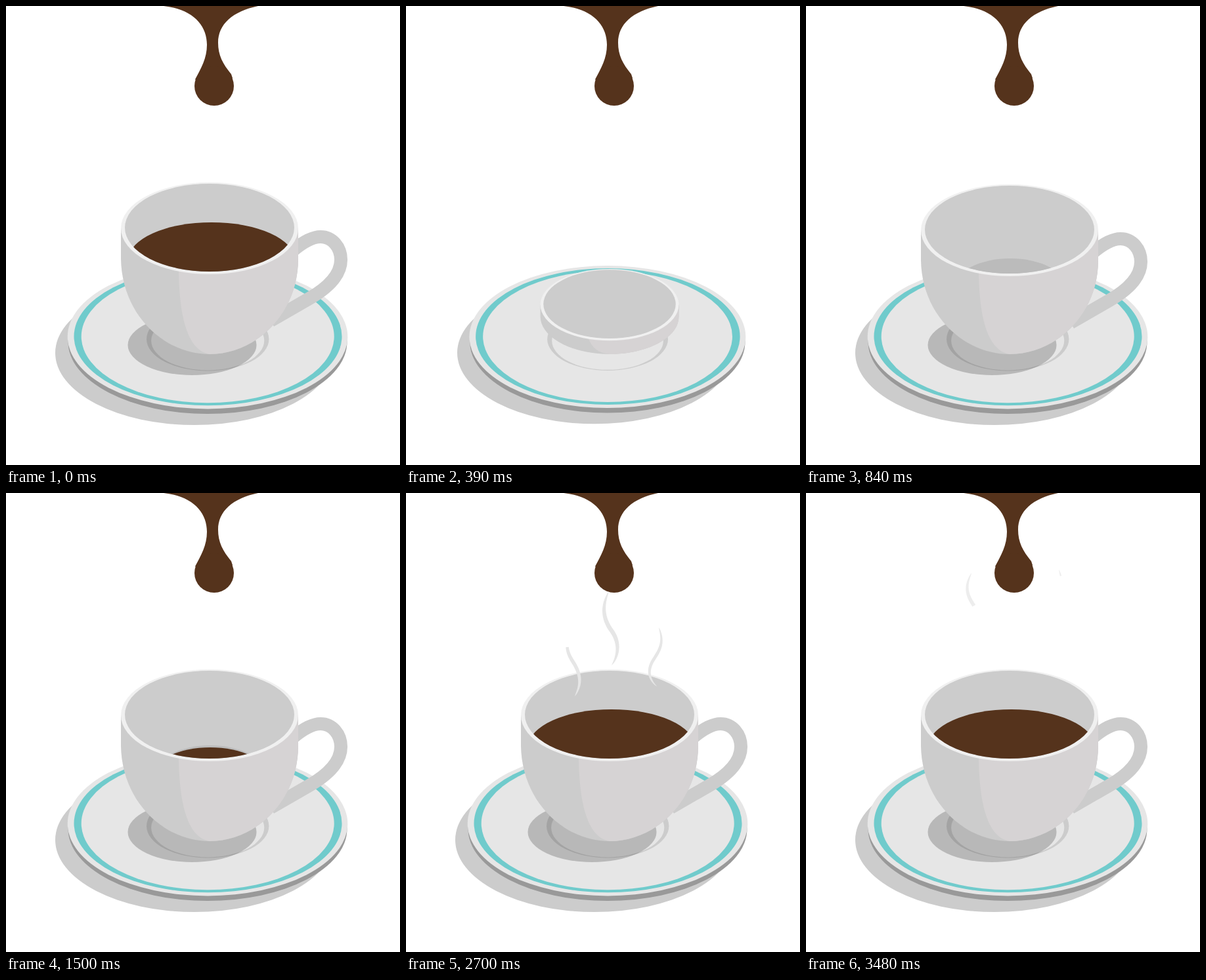
Animation, 600 px wide and 700 px high, one loop 4290 ms. Source, as an HTML page:

```html
<!DOCTYPE html>
<html lang="en">
<head>
<meta charset="utf-8">
<title>Coffee cup</title>
<style>
html, body { margin: 0; width: 100%; height: 100%; overflow: hidden; background: #fff; }
svg { display: block; width: 600px; height: 700px; }
</style>
</head>
<body>
<svg viewBox="0 0 600 700" xmlns="http://www.w3.org/2000/svg">
  <defs>
    <clipPath id="bowl"><ellipse id="bowlClip" cx="310"/></clipPath>
  </defs>

  <g id="saucer">
    <ellipse cx="287" cy="529" rx="212" ry="110" fill="#ccc"/>
    <ellipse cx="307" cy="512" rx="212.5" ry="110" fill="#999"/>
    <ellipse cx="307" cy="504.4" rx="213.3" ry="110" fill="#e6e6e6"/>
    <ellipse cx="307.5" cy="503.9" rx="204" ry="105.4" fill="#70cbcc"/>
    <ellipse cx="307.2" cy="503.9" rx="192.5" ry="101.3" fill="#e6e6e6"/>
    <ellipse cx="307.2" cy="507.9" rx="93.2" ry="48.6" fill="#ccc"/>
    <ellipse cx="307.2" cy="510.4" rx="86" ry="45" fill="#e6e6e6"/>
  </g>

  <ellipse id="shade" fill="#000" opacity=".2"/>

  <g id="cup">
    <path id="handle" fill="none" stroke="#ccc" stroke-width="20"
      d="M438 372C455 358 468 352 479 352C497 352 510 368 510 387C510 412 488 431 462 446L403 480"/>
    <g id="body">
      <path fill="#ccc" d="M-135-192V-146C-134-61-70 0 0 0S135-61 135-146V-192Z"/>
      <path fill="#d6d3d4" d="M-47-192V-127C-46-60-35-6 0 0C70 0 135-61 135-146V-192Z"/>
    </g>
    <ellipse id="rim" cx="310" fill="#f0f0f0"/>
    <ellipse id="inside" cx="310" fill="#ccc"/>
    <g clip-path="url(#bowl)">
      <ellipse id="base" cx="311" cy="430" fill="#bbb"/>
      <ellipse id="coffee" fill="#55331c"/>
    </g>
  </g>

  <g fill="#55331c">
    <path d="M240 0C285 5 306 30 306 59C306 80 297 95 288 112L317 128L345 110L343 104C330 88 323 75 323 56C323 28 345 8 384 0Z"/>
    <circle cx="317" cy="122" r="30"/>
  </g>

  <g id="steam" fill="#e6e6e6"></g>
</svg>

<script>
const LOOP = 4290, STEP = 30, LAST = 3480;
const $ = id => document.getElementById(id);
const set = (el, attrs) => { for (const k in attrs) el.setAttribute(k, attrs[k]); };
const clamp = x => Math.max(0, Math.min(1, x));
const smooth = x => x * x * (3 - 2 * x);
const ramp = (t, from, to) => clamp((t - from) / (to - from));

// Value at time t from [time, value] pairs.
function key(t, pairs, ease = smooth) {
  if (t <= pairs[0][0]) return pairs[0][1];
  for (let i = 1; i < pairs.length; i++) {
    const [t0, v0] = pairs[i - 1], [t1, v1] = pairs[i];
    if (t < t1) return v0 + (v1 - v0) * ease((t - t0) / (t1 - t0));
  }
  return pairs[pairs.length - 1][1];
}
const linear = x => x;

const saucerKeys = [[30, 0], [135, 1.1], [240, .9865], [540, .9865], [660, 1.03], [780, 1]];
const rimKeys = [[240, 525], [510, 406], [660, 326], [840, 342], [1020, 339]];
const widthKeys = [[240, 0], [450, 131.5], [510, 131.5], [690, 136], [840, 135]];
const shadeKeys = [[240, 0], [510, .83], [660, 1.03], [780, 1]];
const handleKeys = [[540, 0], [690, 1.05], [810, 1]];
const levelKeys = [[1230, 406], [1500, 388], [1770, 370], [2310, 347], [2680, 330]];
const riseKeys = [[2200, 63], [2700, 0], [2850, -22], [3390, -88]];

// Paths run from the foot of each wisp to its tip.
const wisps = [
  { d: "M257 310C269 290 265 274 254 257C243 240 243 228 252 210", w: 5.5, grow: [2300, 2830], fade: [3200, 3760] },
  { d: "M313 263C326 245 324 225 313 210C302 195 296 175 309 150", w: 6.5, grow: [2220, 2690], fade: [2880, 3420] },
  { d: "M382 295C368 283 368 268 377 254C386 240 394 228 385 205", w: 4.8, grow: [2220, 2690], fade: [2950, 3540] }
];
for (const s of wisps) {
  const guide = document.createElementNS("http://www.w3.org/2000/svg", "path");
  set(guide, { d: s.d });
  s.guide = guide;
  s.len = guide.getTotalLength();
  s.el = document.createElementNS("http://www.w3.org/2000/svg", "path");
  $("steam").append(s.el);
}

// Tapered ribbon covering the part of a wisp between a and b.
function ribbon(s, a, b) {
  if (b - a < .01) return "";
  const left = [], right = [], n = 28;
  for (let i = 0; i <= n; i++) {
    const u = a + (b - a) * i / n, l = u * s.len;
    const p = s.guide.getPointAtLength(l);
    const p0 = s.guide.getPointAtLength(Math.max(0, l - .5));
    const p1 = s.guide.getPointAtLength(Math.min(s.len, l + .5));
    const dx = p1.x - p0.x, dy = p1.y - p0.y;
    const k = s.w / 2 * Math.pow(Math.max(0, Math.sin(Math.PI * u)), .6) / (Math.hypot(dx, dy) || 1);
    left.push((p.x - dy * k).toFixed(2) + " " + (p.y + dx * k).toFixed(2));
    right.unshift((p.x + dy * k).toFixed(2) + " " + (p.y - dx * k).toFixed(2));
  }
  return "M" + left.concat(right).join("L") + "Z";
}

function drawCup(t) {
  const s = key(t, saucerKeys);
  set($("saucer"), { transform: `translate(297.5 516) scale(${s}) translate(-297.5 -516)` });

  const sh = key(t, shadeKeys);
  set($("shade"), { cx: 305 - 21.5 * sh, cy: 495 + 22 * sh, rx: 98 * sh, ry: 46 * sh });

  const cy = key(t, rimKeys), rx = key(t, widthKeys), f = rx / 135;
  set($("cup"), { visibility: rx > 0 ? "visible" : "hidden" });
  set($("body"), { transform: `translate(310 531) scale(${f} ${(531 - cy) / 192})` });
  set($("rim"), { cy, rx, ry: 70 * f });
  const inner = { cy: cy - 1, rx: 129 * f, ry: 67 * f };
  set($("inside"), inner);
  set($("bowlClip"), inner);

  const h = key(t, handleKeys);
  set($("handle"), { transform: `translate(420 ${430 + cy - 339}) scale(${h}) translate(-420 -430)` });

  const b = smooth(ramp(t, 570, 720));
  set($("base"), { rx: 85 * b, ry: 45 * b });

  const top = key(t, levelKeys, linear), k = clamp((388 - top) / 58);
  const ry = 43 + 13 * k;
  set($("coffee"), {
    cx: 311 + 2 * k, cy: top + ry, rx: 87 + 39 * Math.pow(k, .7), ry,
    visibility: t >= 1260 ? "visible" : "hidden"
  });
}

function drawSteam(t) {
  set($("steam"), {
    transform: `translate(0 ${key(t, riseKeys, linear)})`,
    opacity: 1 - .3 * ramp(t, 3000, 3480)
  });
  for (const s of wisps) set(s.el, { d: ribbon(s, ramp(t, ...s.fade), ramp(t, ...s.grow)) });
}

function draw(ms) {
  const t = Math.min(LAST, Math.floor(ms % LOOP / STEP) * STEP);
  drawCup(t < STEP ? LAST : t);
  drawSteam(t);
}

let start = null;
function tick(now) {
  if (start === null) start = now;
  draw(Math.max(0, now - start));
  requestAnimationFrame(tick);
}
draw(0);
requestAnimationFrame(tick);
</script>
</body>
</html>
```
